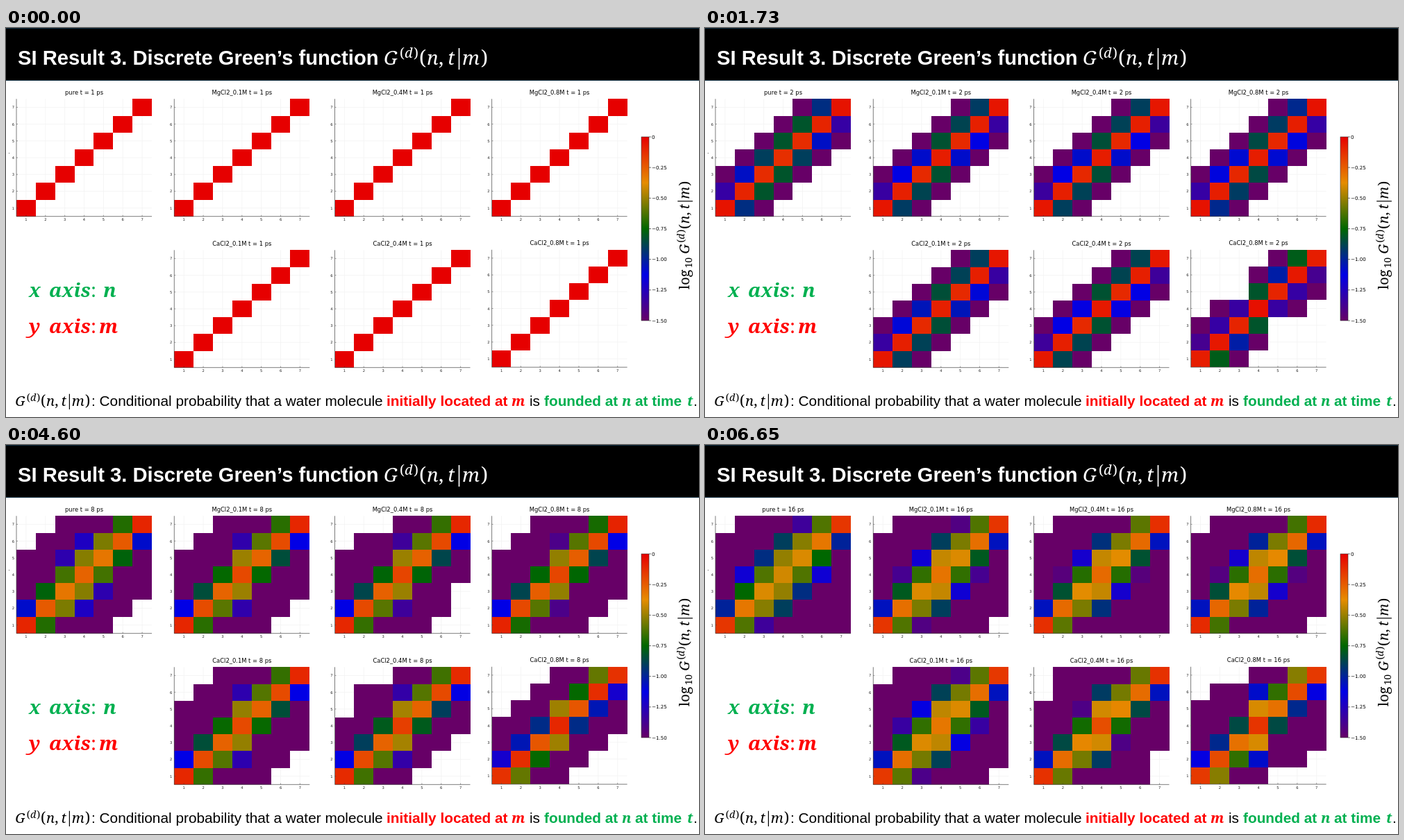
These frames come from a looping animation (998 by 561 pixels, 8000 ms). An HTML page with a canvas:

```html
<!DOCTYPE html>
<html lang="en">
<head>
<meta charset="utf-8">
<title>Discrete Green's function</title>
<style>
html, body { margin: 0; width: 100%; height: 100%; overflow: hidden; background: #fff; }
canvas { display: block; width: 100%; height: 100%; }
</style>
</head>
<body>
<canvas id="stage" width="998" height="561"></canvas>
<script>
const ctx = document.getElementById('stage').getContext('2d');
const W = 998, H = 561, LOOP = 8000;
const STARTS = [0, 500, 2550, 4600, 6650];
const TIMES = [1, 2, 4, 8, 16];
const SANS = '"Liberation Sans", Arial, sans-serif';
const PLOT = '"DejaVu Sans", sans-serif';
const MATH = '"Noto Serif", serif';
const RED = '#ff0000', GREEN = '#00b050';

// colour scale, from 0 down to -1.5
const STOPS = [[230, 0, 0], [230, 140, 0], [0, 103, 0], [0, 0, 230], [103, 0, 103]];

// early, late: log10 hop probability 1>2, 2>1, 2>3, 3>2, 3>4, 4>5
// far: late two-site hops from 1, 2, 3, 4
// gaps: empty cells per row, from the top left | from the bottom right
const PANELS = [
  { name: 'pure', x: 15, y: 102.3, lead: 1.5,
    early: [-.96, -1.32, -.82, -1.07, -.82, -.9],
    late: [-.62, -1, -.53, -.75, -.51, -.62],
    far: [-1.35, -.9, -.96, -1.18],
    gaps: ['4321', '311|321', '21', '1|0'] },
  { name: 'MgCl2_0.1M', x: 242.3, y: 102.3, lead: 1,
    early: [-.91, -1.33, -.88, -1.12, -.83, -1.08],
    late: [-.62, -1.06, -.55, -.8, -.43, -.67],
    far: [-1.42, -.9, -1.18, -1.38],
    gaps: ['4321', '321', '21', '1'] },
  { name: 'MgCl2_0.4M', x: 473.5, y: 102.3, lead: 1,
    early: [-.9, -1.34, -.89, -1.13, -.84, -1.08],
    late: [-.6, -1.06, -.55, -.83, -.43, -.69],
    far: [-2, -.95, -1.2, -1.44],
    gaps: ['4321', '321', '31|211', '1|0'] },
  { name: 'MgCl2_0.8M', x: 699.6, y: 102.3, lead: 1,
    early: [-.98, -1.32, -.91, -1.11, -.86, -1.09],
    late: [-.64, -1.06, -.55, -.84, -.44, -.68],
    far: [-2, -1, -1.2, -1.43],
    gaps: ['4321', '321', '21', '1'] },
  { name: 'CaCl2_0.1M', x: 242.3, y: 320.3, lead: 1,
    early: [-.9, -1.33, -.89, -1.1, -.84, -1.05],
    late: [-.6, -1.06, -.56, -.8, -.44, -.67],
    far: [-1.4, -.89, -1.14, -1.33],
    gaps: ['4321', '321', '21', '1'] },
  { name: 'CaCl2_0.4M', x: 473.5, y: 320.3, lead: 1,
    early: [-.88, -1.35, -.88, -1.13, -.83, -1.14],
    late: [-.58, -1.06, -.56, -.86, -.41, -.72],
    far: [-2, -.91, -1.41, -2],
    gaps: ['4321', '332|331', '311|321', '11'] },
  { name: 'CaCl2_0.8M', x: 699.6, y: 319.8, lead: .85,
    early: [-.79, -1.38, -1.02, -1.32, -.82, -1.33],
    late: [-.53, -1.14, -.67, -.98, -.4, -.86],
    far: [-2, -1.08, -2, -2],
    gaps: ['4331', '332', '321', '31'] }
];
const SIZE = 7, CW = 27.86, CH = 24.2;

// how far each hop has moved from early to late at 4 and 8 ps
const RISE = [[.47, .42, .58, .58, .55, .53], [.78, .75, .84, .86, .83, .82]];

function hue(v) {
  const s = Math.min(3.9999, Math.max(0, -v / .375)), i = Math.floor(s), f = s - i;
  return 'rgb(' + STOPS[i].map((c, k) => Math.round(c + (STOPS[i + 1][k] - c) * f)) + ')';
}

function near(p, step, k) {
  if (step === 1) return p.early[k];
  if (step === 4) return p.late[k];
  const f = RISE[step - 2][k], lead = k > 1 ? p.lead : 1;
  return p.early[k] + (p.late[k] - p.early[k]) * (1 - Math.pow(1 - f, lead));
}

function far(p, step, m) {
  if (step < 3) return -2;
  return p.far[m - 1] - (step === 3 ? .54 - .14 * p.lead : 0);
}

// log10 of G by offset from the home cell, for m = 1..4
function profile(p, step, m) {
  if (step === 0) return { 0: 0 };
  const v = { 1: near(p, step, [0, 2, 4, 5][m - 1]), 2: far(p, step, m) };
  if (m > 1) v[-1] = near(p, step, [1, 3, 5][m - 2]);
  if (m === 4) v[-2] = v[2];
  let rest = 1;
  for (const k in v) if (v[k] > -1.5) rest -= Math.pow(10, v[k]);
  v[0] = Math.log10(rest);
  return v;
}

function text(s, x, y, font, color = '#000', align = 'left') {
  ctx.font = font;
  ctx.fillStyle = color;
  ctx.textAlign = align;
  ctx.fillText(s, x, y);
}

function line(x1, y1, x2, y2, color, width) {
  ctx.strokeStyle = color;
  ctx.lineWidth = width;
  ctx.beginPath();
  ctx.moveTo(x1, y1);
  ctx.lineTo(x2, y2);
  ctx.stroke();
}

function cells(p, step) {
  const [left, right = left] = step ? p.gaps[step - 1].split('|') : [];
  for (let m = 1; m <= SIZE; m++) {
    const flip = m > 4, v = profile(p, step, flip ? 8 - m : m);
    const first = step ? 1 + Number(left[SIZE - m] || 0) : m;
    const last = step ? SIZE - Number(right[m - 1] || 0) : m;
    const top = Math.round(p.y + (SIZE - m) * CH), bottom = Math.round(p.y + (SIZE - m + 1) * CH);
    for (let n = first; n <= last; n++) {
      const d = flip ? m - n : n - m;
      const x = Math.round(p.x + (n - 1) * CW), x2 = Math.round(p.x + n * CW);
      ctx.fillStyle = hue(d in v ? v[d] : -1.5);
      ctx.fillRect(x, top, x2 - x, bottom - top);
    }
  }
}

function panel(p, step) {
  const w = SIZE * CW, h = SIZE * CH, base = p.y + h;
  for (let i = 0; i < SIZE; i++) {
    const x = p.x + (i + .5) * CW, y = base - (i + .5) * CH;
    line(x, p.y, x, base, '#f3f3f3', .8);
    line(p.x, y, p.x + w, y, '#f3f3f3', .8);
  }
  cells(p, step);
  line(p.x, p.y, p.x, base, '#444', .7);
  line(p.x, base, p.x + w, base, '#444', .7);
  for (let i = 0; i < SIZE; i++) {
    const x = p.x + (i + .5) * CW, y = base - (i + .5) * CH;
    line(x, base, x, base - 2, '#444', .5);
    line(p.x, y, p.x + 2, y, '#444', .5);
    text(i + 1, x, base + 6.6, '5.2px ' + PLOT, '#222', 'center');
    text(i + 1, p.x - 3, y + 2, '5.2px ' + PLOT, '#222', 'right');
  }
  text(`${p.name} t = ${TIMES[step]} ps`, p.x + w / 2, p.y - 6.8, '8.4px ' + PLOT, '#000', 'center');
}

// G^(d)(n,t|m) with its baseline at y
function green(x, y, k, color) {
  const it = `italic ${28 * k}px ${MATH}`, up = `${29 * k}px ${MATH}`;
  const put = (s, dx, font, dy = 0) => text(s, x + dx * k, y + dy * k, font, color);
  put('G', -1, it);
  put('(', 22, `${20 * k}px ${MATH}`, -10);
  put('d', 29, `italic ${20 * k}px ${MATH}`, -10);
  put(')', 42, `${20 * k}px ${MATH}`, -10);
  put('(', 50, up);
  put('n', 61, it);
  put(',', 78, up);
  put('t', 91, it);
  line(x + 107.5 * k, y - 24 * k, x + 107.5 * k, y + 7 * k, color, 1.7 * k);
  put('m', 112, it);
  put(')', 139, up);
}

function colorbar() {
  const x = 915, y = 157, w = 11, h = 265;
  const g = ctx.createLinearGradient(0, y, 0, y + h);
  STOPS.forEach((c, i) => g.addColorStop(i / 4, `rgb(${c})`));
  ctx.fillStyle = g;
  ctx.fillRect(x, y, w, h);
  ctx.strokeStyle = '#333';
  ctx.lineWidth = .6;
  ctx.strokeRect(x, y, w, h);
  for (let i = 0; i <= 6; i++) {
    const ty = y + h * i / 6;
    line(x + w, ty, x + w + 3, ty, '#333', .7);
    text(i ? '\u2212' + (i / 4).toFixed(2) : '0', 930, ty + 2.5, '7.1px ' + PLOT);
  }
  ctx.save();
  ctx.translate(984, 377);
  ctx.rotate(-Math.PI / 2);
  text('log', 0, 0, '20px ' + MATH);
  text('10', 31, 4, '13.5px ' + MATH);
  green(52, 0, .7, '#000');
  ctx.restore();
}

function axisNote(letter, name, nameX, y, color) {
  const font = 'italic bold 28px ' + MATH;
  text(letter, 33, y, font, color);
  text('axis', 62, y, font, color);
  text(':', 122, y, '28px ' + MATH, color);
  text(name, nameX, y, font, color);
}

function caption() {
  const y = 545, plain = '20.8px ' + SANS, bold = 'bold ' + plain;
  const math = 'italic bold 20px ' + MATH;
  green(14, y, .72, '#000');
  text(': Conditional probability that a water molecule', 123, y, plain);
  text('initially located at', 548, y, bold, RED);
  text('m', 728, y, math, RED);
  text('is', 754, y, plain);
  text('founded at', 775, y, bold, GREEN);
  text('n', 887, y, math, GREEN);
  text('at time', 906, y, bold, GREEN);
  text('t', 981, y, math, GREEN);
  text('.', 990, y, plain);
}

function draw(step) {
  ctx.fillStyle = '#fff';
  ctx.fillRect(0, 0, W, H);
  ctx.fillStyle = '#000';
  ctx.fillRect(0, 0, W, 75);
  line(0, .5, W, .5, '#0b2a3e', 1);
  line(0, 75.5, W, 75.5, '#0b2a3e', 1);
  text('SI Result 3. Discrete Green\u2019s function', 17, 53, 'bold 29.2px ' + SANS, '#fff');
  green(545, 53, 1, '#fff');
  PANELS.forEach(p => panel(p, step));
  colorbar();
  axisNote('x', 'n', 140, 387.5, GREEN);
  axisNote('y', 'm', 134, 439.5, RED);
  caption();
  ctx.fillStyle = '#555';
  ctx.fillRect(4, 180, 1, 1);
}

let shown = -1;
function tick(now) {
  const t = now % LOOP;
  const step = STARTS.filter(s => s <= t).length - 1;
  if (step !== shown) draw(shown = step);
  requestAnimationFrame(tick);
}
draw(shown = 0);
requestAnimationFrame(tick);
</script>
</body>
</html>
```
